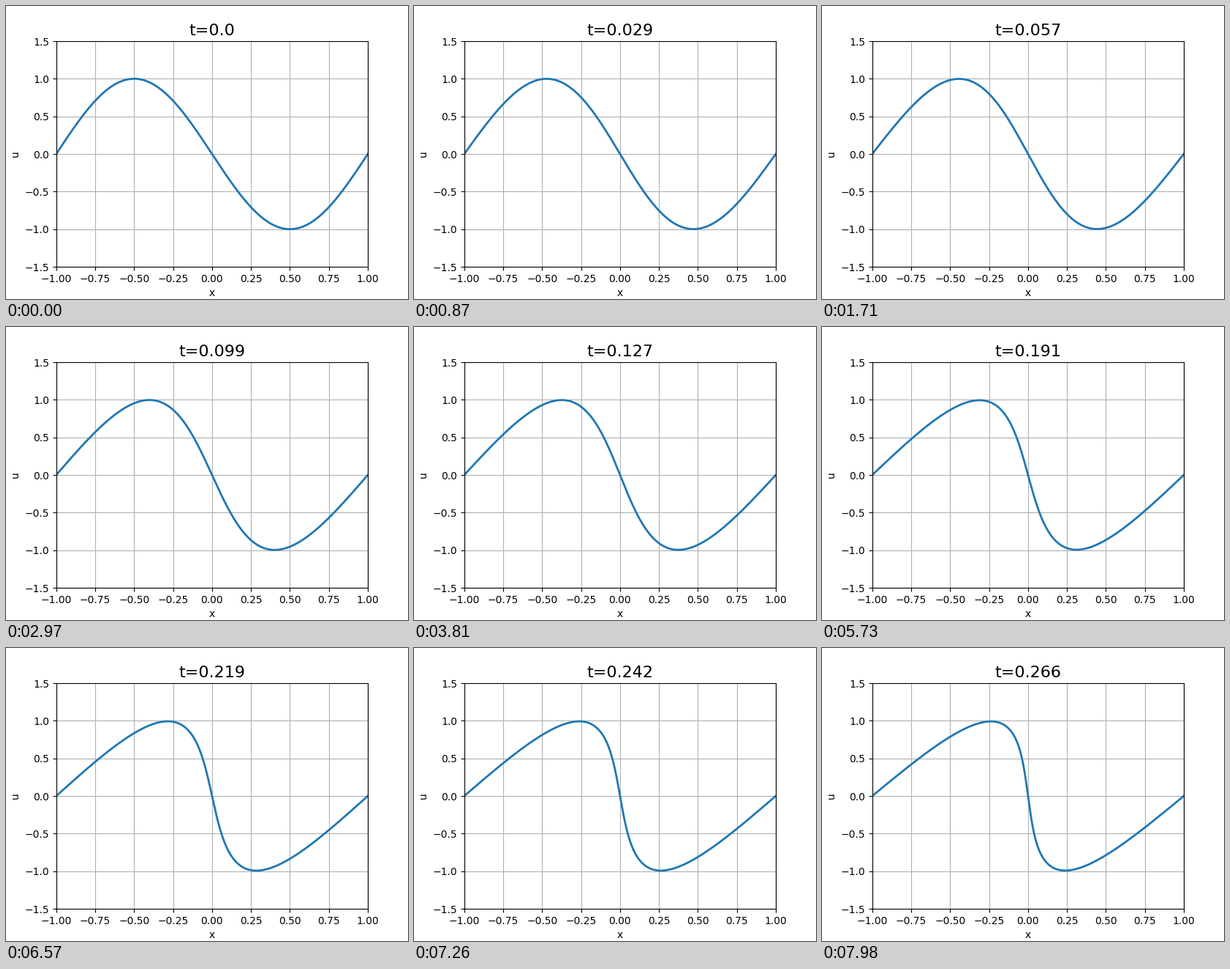
A matplotlib script that plays this animation: 550x400 px, repeating every 8000 ms.

```python
import numpy as np
import matplotlib.pyplot as plt
from matplotlib.animation import FuncAnimation

LOOP_MS = 8000
FRAMES = 267
DT = 0.001
NU = 0.01 / np.pi

x = np.linspace(-1, 1, 401)
nodes, weights = np.polynomial.hermite.hermgauss(100)


def burgers(t):
    """Cole-Hopf solution of Burgers' equation with u(x, 0) = -sin(pi x)."""
    y = x[:, None] - nodes * np.sqrt(4 * NU * t)
    kernel = weights * np.exp(-np.cos(np.pi * y) / (2 * np.pi * NU))
    return -(np.sin(np.pi * y) * kernel).sum(axis=1) / kernel.sum(axis=1)


fig, ax = plt.subplots(figsize=(5.5, 4), dpi=100)
curve, = ax.plot(x, burgers(0), color="#1f77b4", linewidth=2)
title = ax.set_title("t=0.0", fontsize=16)
ax.set_xlim(-1, 1)
ax.set_ylim(-1.5, 1.5)
ax.set_xlabel("x")
ax.set_ylabel("u")
ax.grid(True)


def update(i):
    t = round(i * DT, 3)
    curve.set_ydata(burgers(t))
    title.set_text(f"t={t}")
    return curve, title


anim = FuncAnimation(fig, update, frames=FRAMES, interval=LOOP_MS / FRAMES,
                     init_func=lambda: update(0), repeat=True, repeat_delay=0)
plt.show()
```
